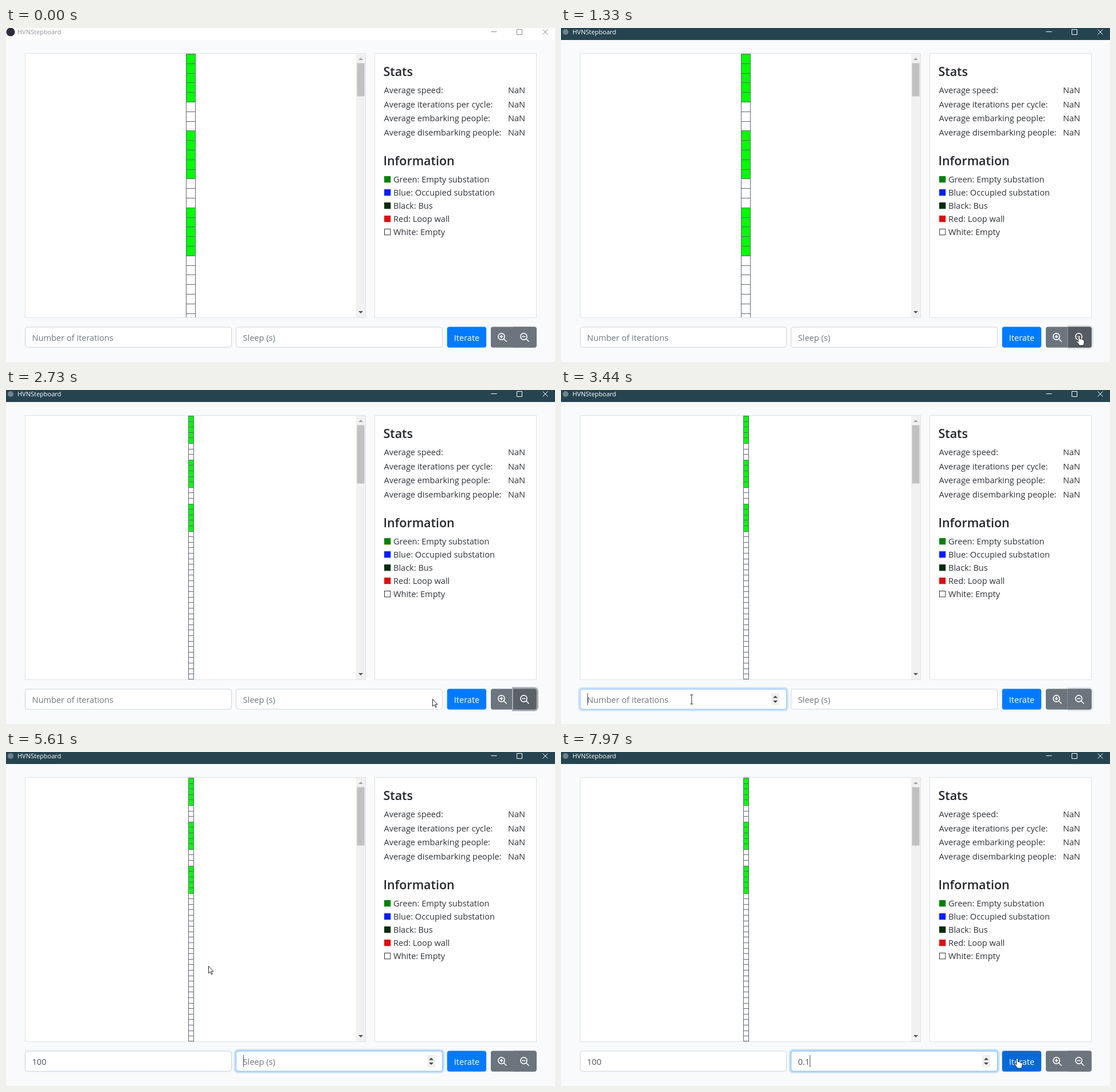
These frames come from a looping animation (958x584 px, 8 s). An HTML page:

```html
<!DOCTYPE html>
<html lang="en">
<head>
<meta charset="utf-8">
<title>HVNStepboard</title>
<style>
html, body { margin: 0; width: 100%; height: 100%; overflow: hidden; background: #f8fafc; }
svg { display: block; width: 100vw; height: 100vh; font: 14.55px "Open Sans", "Noto Sans", sans-serif; }
text { fill: #2c3136; white-space: pre; }
.head { font-size: 21.4px; font-weight: 600; fill: #212529; }
.panel { fill: #fff; stroke: #dee2e6; }
.field { fill: #fff; }
.icon { fill: none; stroke: #fff; stroke-width: 1.6; }
</style>
</head>
<body>
<svg id="stage" viewBox="0 0 958 584">
  <rect id="bar" width="958" height="21"/>
  <circle id="logo" cx="8" cy="7"/>
  <text id="title" x="20" y="11" font-size="11">HVNStepboard</text>
  <path id="controls" fill="none" d="M846.5 6.5h10M891.5 2.5h9v9h-9zM936.5 2.5l9 9M945.5 2.5l-9 9"/>

  <rect class="panel" x="33.5" y="44.5" width="594" height="462"/>
  <clipPath id="view"><rect x="34" y="45" width="577" height="461"/></clipPath>
  <g clip-path="url(#view)">
    <path id="stops" fill="#0f0"/>
    <path id="grid" fill="none" stroke="#5f667a"/>
  </g>
  <rect x="611" y="45" width="16" height="461" fill="#f1f1f1"/>
  <rect id="thumb" x="612.5" y="61.5" width="13" fill="#c1c1c1"/>
  <path d="M615 56h8l-4-4z" fill="#a3a3a3"/>
  <path d="M615 495h8l-4 4z" fill="#505050"/>

  <rect class="panel" x="643.5" y="44.5" width="282" height="462"/>
  <text class="head" x="658.5" y="83.5">Stats</text>
  <text class="head" x="658.5" y="240">Information</text>
  <g id="info"></g>
  <g id="fields"></g>

  <rect id="iterate" x="769.7" y="522.5" width="68.4" height="36.2" rx="4"/>
  <text x="804" y="546.5" text-anchor="middle" style="fill:#fff">Iterate</text>
  <rect x="846" y="522.5" width="79.8" height="36.2" rx="4" fill="#6c757d"/>
  <path id="outRing" d="M883 519.5h39a7 7 0 0 1 7 7v28a7 7 0 0 1-7 7h-39z" fill="#a5abb1"/>
  <path id="out" d="M885 522.5h36.8a4 4 0 0 1 4 4v28.2a4 4 0 0 1-4 4h-36.8z"/>
  <path class="icon" d="M861.5 539.5h6M864.5 536.5v6"/>
  <path class="icon" d="M900.5 539.5h6"/>
  <g id="lenses"></g>
  <path id="cursor" stroke="#111" stroke-width=".9"/>
</svg>
<script>
const LOOP = 8000;
const $ = id => document.getElementById(id);

function set(el, attrs) {
  for (const k in attrs) el.setAttribute(k, attrs[k]);
}
function add(parent, tag, attrs, text = "") {
  const el = document.createElementNS("http://www.w3.org/2000/svg", tag);
  set(el, attrs);
  el.textContent = text;
  parent.append(el);
  return el;
}
const fade = (el, opacity) => set(el, { opacity: +opacity });
const clamp = v => Math.max(0, Math.min(1, v));
const latest = (list, t) => list.filter(e => e[0] <= t).pop();
// Focus ring strength, easing in and out
const glow = (t, from, to) => t < from ? 0 : clamp((t - from + 40) / 130) * clamp((to + 90 - t) / 130);

// Static lists
["Average speed:", "Average iterations per cycle:", "Average embarking people:", "Average disembarking people:"]
  .forEach((label, i) => {
    const y = 114 + i * 24.6;
    add($("info"), "text", { x: 659.5, y }, label);
    add($("info"), "text", { x: 876, y }, "NaN");
  });
[["#008000", "Green: Empty substation"], ["#001eff", "Blue: Occupied substation"],
 ["#022b0b", "Black: Bus"], ["#dc0d0d", "Red: Loop wall"], ["#fff", "White: Empty"]]
  .forEach(([fill, label], i) => {
    const y = 270 + i * 23;
    add($("info"), "rect", { x: 660.5, y: y - 10.5, width: 10.3, height: 10.3, fill, stroke: i < 4 ? fill : "#333" });
    add($("info"), "text", { x: 676, y }, label);
  });
for (const x of [864.5, 903.5]) {
  add($("lenses"), "circle", { class: "icon", cx: x, cy: 539.5, r: 5.6 });
  add($("lenses"), "path", { class: "icon", d: `M${x + 4} 543.5l5 5` });
}

// Number inputs
function makeField(x, hint, from, to, typed) {
  const g = $("fields"), box = { width: 360, height: 35.2, rx: 4, x: x + .5, y: 523 };
  const ring = add(g, "rect", { x: x - 3, y: 519.5, width: 367, height: 42, rx: 7, fill: "#bfdeff" });
  add(g, "rect", { ...box, class: "field", stroke: "#ced4da" });
  const edge = add(g, "rect", { ...box, fill: "none", stroke: "#80bdff" });
  const spin = add(g, "g", {});
  add(spin, "rect", { x: x + 334, y: 530, width: 14, height: 21, fill: "#efefef" });
  add(spin, "path", { d: `M${x + 337} 538.5h8l-4-4zM${x + 337} 543h8l-4 4z`, fill: "#444" });
  const label = add(g, "text", { x: x + 12.5, y: 546.7 });
  const caret = add(g, "rect", { y: 530, width: 1, height: 21, fill: "#495057" });
  return t => {
    const value = (latest(typed, t) || [0, ""])[1];
    const focused = t >= from && t < to;
    const since = t - (latest([[from], ...typed], t) || [0])[0];
    label.textContent = value || hint;
    label.style.fill = value ? "#495057" : "#6c757d";
    fade(ring, glow(t, from, to));
    fade(edge, glow(t, from, to));
    fade(spin, focused);
    fade(caret, focused && Math.floor(since / 530) % 2 === 0);
    set(caret, { x: Math.round(x + 12.5 + (value ? label.getComputedTextLength() : 0)) });
  };
}
const fields = [
  makeField(33, "Number of iterations", 3380, 5530, [[4370, "1"], [4990, "10"], [5140, "100"]]),
  makeField(401, "Sleep (s)", 5530, LOOP + 90, [[5990, "0"], [6150, "0."], [6390, "0.1"]]),
];

// Cell column at the given cell size
function drawCells(size) {
  const pitch = .96 * size;
  const left = Math.round(322.5 - pitch / 2) + .5;
  const width = Math.floor(322.5 + pitch / 2) + .5 - left;
  const row = i => Math.round(45 + i * pitch) + .5;
  let stops = "", lines = `M${left} 45v461M${left + width} 45v461`;
  for (let i = 0; 45 + i * pitch < 506; i++) {
    lines += `M${left} ${Math.min(505.5, row(i))}h${width}`;
    if (i < 24 && i % 8 < 5) stops += `M${left} ${row(i)}h${width}V${row(i + 1)}h${-width}z`;
  }
  set($("stops"), { d: stops });
  set($("grid"), { d: lines });
  set($("thumb"), { height: Math.round(1015 / size) });
}

// Pointer
const ARROW = "M.5.5V13L3.4 10.4 5.4 15 7.2 14.2 5.2 9.7H9z";
const HAND = "M-1.5 12V1.5Q-1.5 .5 0 .5T1.5 1.5V7Q4 5.5 4.5 7.5 6.5 6.5 7 8.5 9 8 9 10V13Q9 15 7.5 18H.5Q-1 15-4.5 11.5-4 9-1.5 11z";
const BEAM = "M-2.5-8H2.5M0-8V8M-2.5 8H2.5";
const moves = [
  [450, 901, 538], [530, 899, 526], [610, 896, 511], [770, 895, 524], [850, 902, 538],
  [1010, 903, 537], [1090, 904, 537],
  [2730, 744, 540], [2810, 600, 515], [2890, 430, 504], [2970, 290, 535], [3050, 224, 558],
  [3200, 226, 548], [3280, 228, 541], [3520, 236, 530], [3600, 280, 470], [3680, 330, 400], [3750, 353, 374],
];
function pointer(t) {
  if (t < 7330) return latest(moves, t) || [0, -99, -99];
  const u = Math.min(9, Math.floor((t - 7330) / 80) + 1) / 9;
  const e = u * u * (3 - 2 * u);
  return [t, 353 + 443 * e, 374 + 161 * e];
}

function draw(t) {
  const active = t >= 1330;
  set($("bar"), { fill: active ? "#264450" : "#fff" });
  set($("logo"), active ? { r: 5, fill: "#70828b" } : { r: 7.5, fill: "#2b2e3a" });
  $("title").style.fill = active ? "#fff" : "#8f959b";
  set($("controls"), { stroke: active ? "#fff" : "#8a8a8a" });

  drawCells(latest([[0, 17.5], [1410, 15], [1880, 12.5], [2190, 10]], t)[1]);
  fields.forEach(f => f(t));

  const [, x, y] = pointer(t);
  const inRow = y >= 523 && y < 558;
  const onIterate = inRow && x >= 770 && x < 838;
  const onOut = inRow && x >= 885 && x < 926;
  const onField = inRow && (x >= 33 && x < 394 || x >= 401 && x < 735);
  const shape = onIterate || onOut ? HAND : onField ? BEAM : ARROW;
  set($("cursor"), { d: shape, transform: `translate(${x} ${y})`, fill: shape === BEAM ? "none" : "#fff" });

  const focused = t >= 1330 && t < 3380;
  const pressed = t >= 1330 && t < 1410 || t >= 1720 && t < 1880;
  fade($("outRing"), glow(t, 1330, 3380));
  set($("out"), { fill: pressed ? "#545b62" : focused || onOut ? "#5a6268" : "#6c757d" });
  set($("iterate"), { fill: onIterate ? "#0069d9" : "#007bff" });
}

const start = performance.now();
function tick() {
  draw((performance.now() - start) % LOOP);
  requestAnimationFrame(tick);
}
tick();
</script>
</body>
</html>
```
